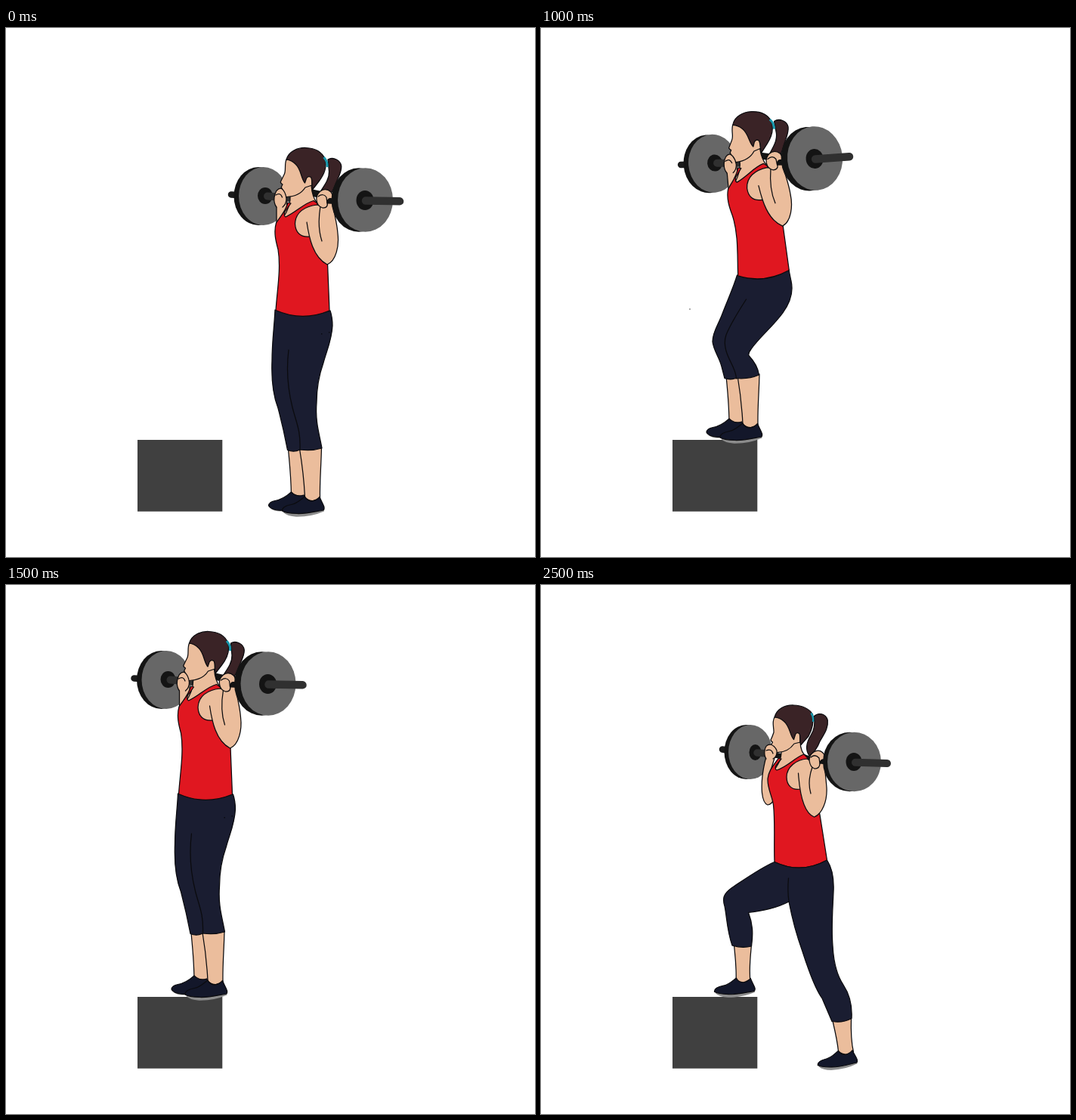
An HTML page for the animation above (3 s loop, 700 by 700 pixels).

```html
<!DOCTYPE html>
<html lang="en">
<head>
<meta charset="utf-8">
<title>Barbell step-up</title>
<style>
html, body { margin: 0; width: 100%; height: 100%; overflow: hidden; background: #fff; }
svg { display: block; width: 100vw; height: 100vh; }
.line { fill: none; }
.ink { stroke: #0b0b0e; stroke-width: 1.25; stroke-linejoin: round; stroke-linecap: round; }
</style>
</head>
<body>
<svg id="stage" viewBox="0 0 700 700"></svg>
<script>
const SKIN = '#ebbd9c', RED = '#e01720', NAVY = '#1a1d31', SHOE = '#13172a',
      HAIR = '#3a2326', BAND = '#1597ac', STEEL = '#676767', DARK = '#141414', BAR = '#303030';

const shape = (d, fill) => `<path class="ink" d="${d}" fill="${fill}"/>`;
const flat = (d, fill) => `<path d="${d}" fill="${fill}"/>`;
const line = d => `<path class="ink line" d="${d}"/>`;
const bar = (d, w, color = BAR) =>
  `<path d="${d}" fill="none" stroke="${color}" stroke-width="${w}" stroke-linecap="round"/>`;
const oval = (x, y, rx, ry, fill) =>
  `<ellipse cx="${x}" cy="${y}" rx="${rx}" ry="${ry}" fill="${fill}"/>`;
const plate = (x, y, rx, ry, depth) =>
  oval(x - depth, y, rx, ry, DARK) + oval(x, y, rx, ry, STEEL);
const group = (body, transform = '') => `<g transform="${transform}">${body}</g>`;

// Near shoe with the heel on the right
const shoe = transform => group(
  flat('M367 641 Q372 646 384 646.7 Q404 647 421 639.5 L420 634 L368 638Z', '#8c8c8c') +
  shape('M365.5 639 C365 634 370 632 378 630.5 C386 629 390 624 395.5 620 Q398 626 405 626 Q411 625 415 620.5 C417 626 420 630 421 634 Q421.5 637 420 638 C408 640 398 643 385 642.5 Q370 642 365.5 639Z', SHOE),
  transform);

const calves =
  shape('M373.5 557 C375 575 377 590 377.5 618 Q386 626 396 619 L394 557Z', SKIN) +
  flat('M350 636 Q358 641 368 639 L368 635Z', '#8c8c8c') +
  shape('M347.5 632 Q348 627 356 625.5 C366 624 372 619 377.5 614 Q384 621 394 618 L397 624 L368 638 C359 639 350 637 347.5 632Z', SHOE) +
  shape('M388.5 557 C391 572 394 590 395.5 621 Q405 630 415.5 622 C415 600 417 580 417.5 555Z', SKIN) +
  shoe('');

const standPants =
  shape('M356 373 C355 395 352 415 352 440 C351 465 353 485 360 503 C365 522 369 540 372.5 558.5 Q381 562 389 558 Q405 560 418 556 C415 538 409 522 411 496 C411 475 414 460 420 443 C425 425 431 413 432 394 Q432 383 429 374 Q392 388 356 373Z', NAVY) +
  line('M374 426 C371 450 373 478 379 502 C384 522 390 532 389 558') +
  flat('M417 404h1.4v1.4h-1.4zM427 402h1.4v1.4h-1.4z', '#08090f');

const bentPants =
  shape('M259.5 327 C254 345 246 362 240 378 C235 392 227 402 227 415 C228 426 236 436 239 448 L243 463.5 Q250 466 258.5 463.5 Q275 465 288.5 459 C287 449 283 442 275 433.5 Q274 430 278 425 C290 408 306 396 320 377 C330 363 334 348 331 335 L328 320 Q296 340 259.5 327Z', NAVY) +
  line('M271.5 359 C262 374 252 389 245 406 C240 420 247 434 252 444 Q258 456 258.5 464');

const standShirt = 'M373 231 C370 243 363 249 357.5 258 C354 270 357 282 360 293 C364 318 359 345 357 373.5 Q392 389 428 374 L425.5 311 L414 270 L412 232 L407 228.5 C394 232 385 243 370 250 Q367 249 369 243 L377 232Z';
const bentShirt = 'M373 231 C370 243 363 249 357.5 258 C354 270 357 282 360 293 C366 318 362 345 360.5 373.5 Q394 387 428.5 372 L425.5 311 L414 270 L412 232 L407 228.5 C394 232 385 243 370 250 Q367 249 369 243 L377 232Z';

const wideTop = shirt =>
  bar('M298 220.5L306 221', 8.5, '#1b1b1b') +
  plate(340.5, 222.5, 32.5, 38.5, 6.5) +
  oval(343, 222, 10, 11, DARK) + bar('M346 222.5L376 225', 10) +
  bar('M400 217L414 220', 9, DARK) +
  shape('M358 234 L358 262 L373 244 L371 230Z', SKIN) +
  shape('M426 174 C433 170 443 175 443.8 183 C444 193 438 199 434 212 L430 219 L413 221 C420 210 428 201 427.5 190Z', HAIR) +
  shape('M376 220 C377 231 373 242 366 252 L385 250 L412 232 Q405 224 404 208 L390 208Z', SKIN) +
  shape(shirt, RED) +
  shape('M411.5 234 C395 236 383 244 382.5 259 C383 270 389 277 401 276 L418 285 L420 236Z', SKIN) +
  shape('M371 174 C368 181 371 189 368 194 Q365 200 363.2 204 Q364 206 366 207 L364.2 210.5 L366 214 C364.5 219 366 223.5 371 223.5 C383 223 391 219 396 211 L405 208 L405 192 L385 174Z', SKIN) +
  shape('M371 174 C374 163 386 158 397 158.5 C409 159 418 164 422 173 C425 183 421 194 414 203 L405.5 214 C404 208 406 202 403.5 197.5 Q400 195 397.5 199 L395.5 205 C390 199 391 187 383 180 Q378 175 371 174Z', HAIR) +
  `<path d="M420.5 171 Q426 177 425 184" fill="none" stroke="${BAND}" stroke-width="3"/>` +
  flat('M358 237 Q354 232 355 224 Q357 212 364 212 Q370 216 371 226 Q372 234 367 240Z', SKIN) +
  line('M358 237 Q354 232 355 224 Q357 212 364 212 Q370 216 371 226 Q371 233 366 237') +
  line('M357 221 Q363 217 365.5 224') +
  flat('M398 257 C401 277 406 303 425 313 C437 308 441 288 439 272 C438 257 434 246 432 231 L415 232 L411 250Z', SKIN) +
  line('M398 257 C401 277 406 303 425 313 C437 308 441 288 439 272 C438 257 434 246 432 231') +
  line('M416 236 C413 254 414 270 418 282') +
  bar('M426 228.5L436 229', 8, DARK) +
  shape('M411 228 Q410 221 416 216 Q423 211 430 217 Q433 221 432 226 Q426 224 425 230 Q427 238 419 238 Q412 236 411 228Z', SKIN) +
  line('M413 223 Q420 218 424 224L425 232') +
  plate(475.5, 227.5, 36.5, 42.3, 8.5) +
  oval(475, 228, 11.5, 13, DARK) + bar('M476 228.5L521 229.3', 10.5);

const lunge =
  bar('M240 217.5L249 219', 8.5, '#1b1b1b') +
  plate(277, 221, 29, 36, 5.5) +
  oval(283.5, 221.5, 8, 10.5, DARK) + bar('M286 222L300 223', 9.5) +
  bar('M308 225L322 227M344 226L358 231', 7, DARK) +
  shape('M298 227 C294 242 291 258 292.5 275 Q294 289 300 291 Q306 290 308 283 L302 252 L309 229Z', SKIN) +
  shape('M361 174 C367 168 377 170 379.3 179 C380.5 190 374 198 369 207 C366 215 361 222 355 226 C349 217 352 207 357 199 C362 191 363 183 361 174Z', HAIR) +
  shape('M318 219 C318.5 231 313 239 307 247 L325 248 L352 228 Q343 222 343 206 L330 206Z', SKIN) +
  shape('M314 229.5 C308 238 300 247 300 258 C300 270 306 280 307.5 291 C310 315 308 340 309 366.5 Q344 383 378.5 364 L369 304 L358 265 L353 229 L348 224 C336 228 327 240 312 245 Q309 244 311 239 L318 230Z', RED) +
  shape('M352 230 C338 231 325 241 325 254 C325 265 332 272 343 270 L358 275 L362 236Z', SKIN) +
  shape('M309 175 C305 182 308.5 189 308 195 Q306 201 304 205 Q304.5 207 306.5 208 L304.8 211 L306.3 215 C305.5 219 307 221.5 311 221.5 C322 222 330 217 335 210 L343 208 L344 192 L324 174Z', SKIN) +
  shape('M309 175 C312 164 322 158.8 334 159 C346 159.5 355 164 359.5 171 C361 181 359 191 354 200 L344 211.5 C341 206 344 201 342 197 Q338.5 194 336.5 198 L334.5 204.5 C329 199 330 187 321 180 Q316 175.5 309 175Z', HAIR) +
  `<path d="M357.5 169.5 Q361 175 360 181" fill="none" stroke="${BAND}" stroke-width="2.4"/>` +
  flat('M298 230 Q295 226 296 219 Q297 211 303 211 Q309 212 312 219 Q313 227 307 231Z', SKIN) +
  line('M298 230 Q295 226 296 219 Q297 211 303 211 Q309 212 312 219 Q313 227 307 230') +
  line('M298 219 Q305 216 307 223') +
  flat('M340.5 249 C342 271 346 301 361.5 307 C372 303 379 286 378 268 C377 256 376 248 375 235 L358 236 L351 245Z', SKIN) +
  line('M340.5 249 C342 271 346 301 361.5 307 C372 303 379 286 378 268 C377 256 376 248 375 235') +
  line('M359 241 C354 255 354 266 357 276') +
  bar('M369 233L378 234', 7, DARK) +
  shape('M355 232 Q355 225 361 221 Q368 217 373 222 Q376 225 375 231 Q370 230 369 236 Q369 243 362 243 Q356 241 355 232Z', SKIN) +
  line('M357 228 Q363 223 368 229L369 236') +
  plate(414.5, 234, 35.5, 39.3, 6) +
  oval(414, 234, 10.5, 12, DARK) + bar('M416 234.8L458 236', 10) +
  shape('M385.5 575 C389 590 392 602 393.5 617 Q403 625 413.5 618 C410 603 410 588 410.5 572Z', SKIN) +
  shoe('rotate(-3 392 630) translate(20.6 30.4) scale(.945)') +
  shape('M255.5 477 C257 492 259 506 258 526 Q267 532 277 525 C275 508 277 493 278.5 476Z', SKIN) +
  shoe('translate(-123.2 -78.3) scale(.965)') +
  shape('M309 366.5 C291 374 270 389 252 401 C241 409 240 415 243 425 C246 440 246 457 253 477 Q266 481 278.5 478 C281 460 280 448 274.5 433.5 C293 431 311 428 328 419 C332 440 338 463 346 485 C355 513 364 536 372 547 L385 577.5 Q399 580 411 573.5 C412 557 408 541 400 529 C390 514 387 497 386 477 C384 453 386 430 387 406 C388 386 385 374 378.5 364 Q344 383 309 366.5Z', NAVY) +
  line('M327.5 388 Q326 404 328 419');

const stand = calves + standPants + wideTop(standShirt);
const onBox = 'translate(-128.5 -97)';
const bent = group(calves, onBox) + bentPants +
  group(wideTop(bentShirt), 'translate(-131 -12.7) rotate(-5)') +
  oval(197, 372, .8, .8, '#444');

const stage = document.getElementById('stage');
stage.innerHTML = '<path d="M174 545H286.3V639.7H174Z" fill="#404040"/>' +
  [stand, lunge, bent, group(stand, onBox)].map(p => `<g class="pose">${p}</g>`).join('');
const poses = [...stage.querySelectorAll('.pose')];
const order = [0, 1, 2, 3, 2, 1], STEP = 500;

function draw(t) {
  const now = order[Math.floor(t / STEP) % order.length];
  poses.forEach((g, i) => g.setAttribute('display', i === now ? 'inline' : 'none'));
}

let start;
function tick(t) {
  start ??= t;
  draw(Math.max(0, t - start));
  requestAnimationFrame(tick);
}
draw(0);
requestAnimationFrame(tick);
</script>
</body>
</html>
```
